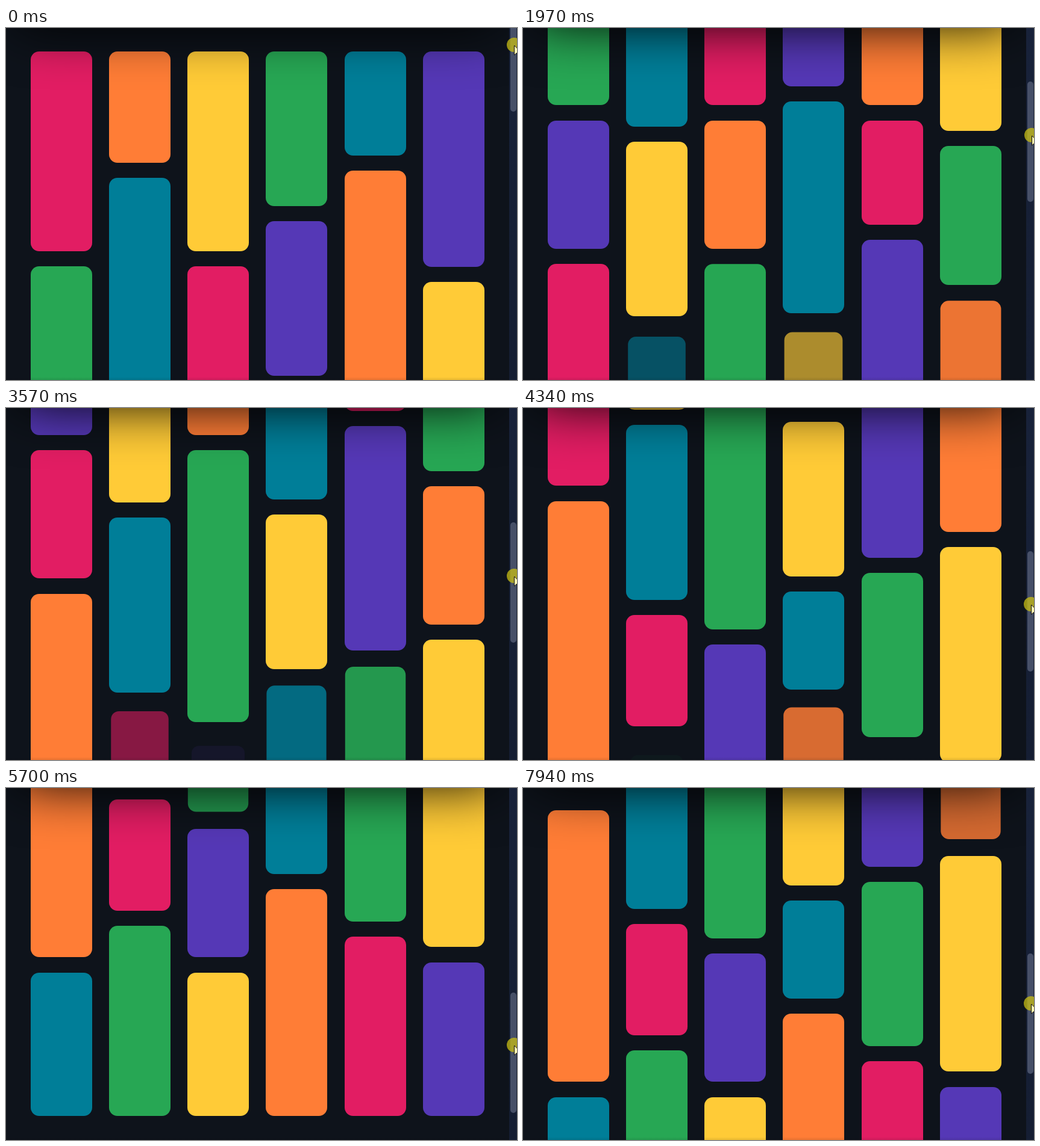
An HTML page that plays this animation: 848 by 585 pixels, repeating every 8000 ms.

```html
<!DOCTYPE html>
<html lang="en">
<head>
<meta charset="utf-8">
<title>Scrolling tiles</title>
<style>
  html, body { margin: 0; width: 100%; height: 100%; overflow: hidden; background: #0e131b; }
  #stage { position: relative; width: 848px; height: 585px; overflow: hidden; }
  #page, #view { position: absolute; inset: 0 13px 0 0; }
  #view { overflow: hidden; }
  .tile { position: absolute; width: 102px; border-radius: 14px; }
  .shade { position: absolute; left: 16px; right: 16px; top: -205px; height: 200px; box-shadow: 0 0 90px #000; }
  .foot { position: absolute; left: 0; right: 0; bottom: 0; height: 5px; background: linear-gradient(transparent, rgba(0, 0, 0, .1)); }
  #track { position: absolute; left: 835px; top: 0; width: 13px; height: 585px; background: linear-gradient(#18223a, #151e33); }
  #thumb { position: absolute; left: 837px; top: 0; width: 10px; height: 200px; border-radius: 5px; background: #475068; }
  #pointer { position: absolute; left: 0; top: 0; overflow: visible; }
</style>
</head>
<body>
<div id="stage">
  <div id="view">
    <div id="page"></div>
    <div class="shade"></div>
    <div class="foot"></div>
  </div>
  <div id="track"></div>
  <div id="thumb"></div>
  <svg id="pointer" width="1" height="1">
    <circle r="12" fill="#c8be14" fill-opacity=".75"/>
    <path d="M.5 1v16l4-3.5 2.5 5.5 2.5-1-2.5-5.5h5z" fill="#fff6b0" stroke="#111" stroke-width="1"/>
  </svg>
</div>
<script>
const LOOP = 8000, STEP = 5, VIEW_H = 585, FADE = 800, SMALL = 0.85;
const PAGE_TOP = 38.68, PAGE_H = 1788.3, GAP = 25.3;
const COLORS = { P: '#e21d63', O: '#ff7d36', Y: '#ffcb37', G: '#27a754', T: '#007e98', V: '#5538b6' };

// Each column shares the page height among its tiles by weight.
const COLUMNS = [
  'P3 G2 V2 P2 O4 T2',
  'O2 T4 Y3 T3 P2 G3',
  'Y3 P2 O2 G4 V2 Y2',
  'G3 V3 T4 Y3 T2 O4',
  'T2 O4 P2 V4 G3 P3',
  'V3 Y2 G2 O2 Y3 V2'
];

// The hand drags the bar to the end, rests, then goes back up: time and scroll.
const DRAG = [
  [0, 0], [1130, 299], [1970, 481], [2680, 631], [2940, 631], [3900, 893],
  [4340, 957], [5700, 1282], [6400, 1282], [6780, 1174], [7390, 1167], [7940, 1075], [LOOP, 1075]
];
// The picture stands still here while the page goes on underneath.
const STALLS = [[5700, 6440], [7390, 7660]];

function scrollAt(t) {
  const i = DRAG.findIndex(([time]) => time > t);
  const [t0, s0] = DRAG[i - 1], [t1, s1] = DRAG[i];
  return s0 + (s1 - s0) * (t - t0) / (t1 - t0);
}

// cubic-bezier(.25, .1, .25, 1)
function ease(x) {
  if (x <= 0) return 0;
  if (x >= 1) return 1;
  const curve = (p, q, s) => 3 * p * s * (1 - s) ** 2 + 3 * q * s * s * (1 - s) + s ** 3;
  let lo = 0, hi = 1;
  for (let i = 0; i < 18; i++) {
    const mid = (lo + hi) / 2;
    if (curve(.25, .25, mid) < x) lo = mid; else hi = mid;
  }
  return curve(.1, 1, lo);
}

const page = document.getElementById('page');

function buildColumn(text, col) {
  const items = text.split(' ').map(([color, weight]) => ({ color, weight: +weight }));
  const unit = PAGE_H / items.reduce((sum, item) => sum + item.weight, 0);
  let y = PAGE_TOP;
  return items.map(({ color, weight }, row) => {
    const top = y, h = weight * unit - (row < items.length - 1 ? GAP : 0);
    y += weight * unit;
    const el = document.createElement('div');
    el.className = 'tile';
    el.style.left = Math.round(41 + 130.15 * col) + 'px';
    el.style.top = Math.round(top) + 'px';
    el.style.height = Math.round(top + h) - Math.round(top) + 'px';
    el.style.background = COLORS[color];
    page.append(el);
    const shown = top < VIEW_H;
    return { el, top, h, shown, fades: [{ t: 0, from: +shown, to: +shown }] };
  });
}
const tiles = COLUMNS.flatMap(buildColumn);

// Hidden tiles are smaller, so they come into view later than they leave it;
// the tallest ones leave before they are fully past the top.
function inView({ top, h, shown }, scroll) {
  const inset = shown ? 0 : h * (1 - SMALL) / 2;
  const early = h > 400 ? 64 : 0;
  return top + h - scroll > Math.max(inset, early) && VIEW_H - top + scroll > inset;
}

function amount(tile, t) {
  const fade = tile.fades.findLast(f => f.t <= t);
  return fade.from + (fade.to - fade.from) * ease((t - fade.t) / FADE);
}

// Work out once when every tile starts to fade.
for (let t = 0; t < LOOP; t += STEP) {
  for (const tile of tiles) {
    const seen = inView(tile, scrollAt(t));
    if (seen === tile.shown) continue;
    tile.fades.push({ t, from: amount(tile, t), to: +seen });
    tile.shown = seen;
  }
}

const thumb = document.getElementById('thumb'), pointer = document.getElementById('pointer');

function draw(time) {
  const stall = STALLS.find(([from, to]) => time >= from && time < to);
  const t = stall ? stall[0] : time;
  const scroll = scrollAt(t);
  const thumbY = Math.round(scroll / 3.2 - 61);
  const pointerX = 843 + 5 * Math.exp(-(((t - 1130) / 700) ** 2));
  const pointerY = thumbY + 89 - 6 * (t / LOOP) ** 4;
  page.style.transform = `translateY(${-Math.round(scroll)}px)`;
  for (const tile of tiles) {
    const a = amount(tile, t);
    tile.el.style.opacity = a;
    tile.el.style.transform = a === 1 ? 'none' : `scale(${SMALL + (1 - SMALL) * a})`;
  }
  thumb.style.transform = `translateY(${thumbY}px)`;
  pointer.style.transform = `translate(${Math.round(pointerX)}px, ${Math.round(pointerY)}px)`;
}

const start = performance.now();
function frame() {
  draw((performance.now() - start) % LOOP);
  requestAnimationFrame(frame);
}
frame();
</script>
</body>
</html>
```
